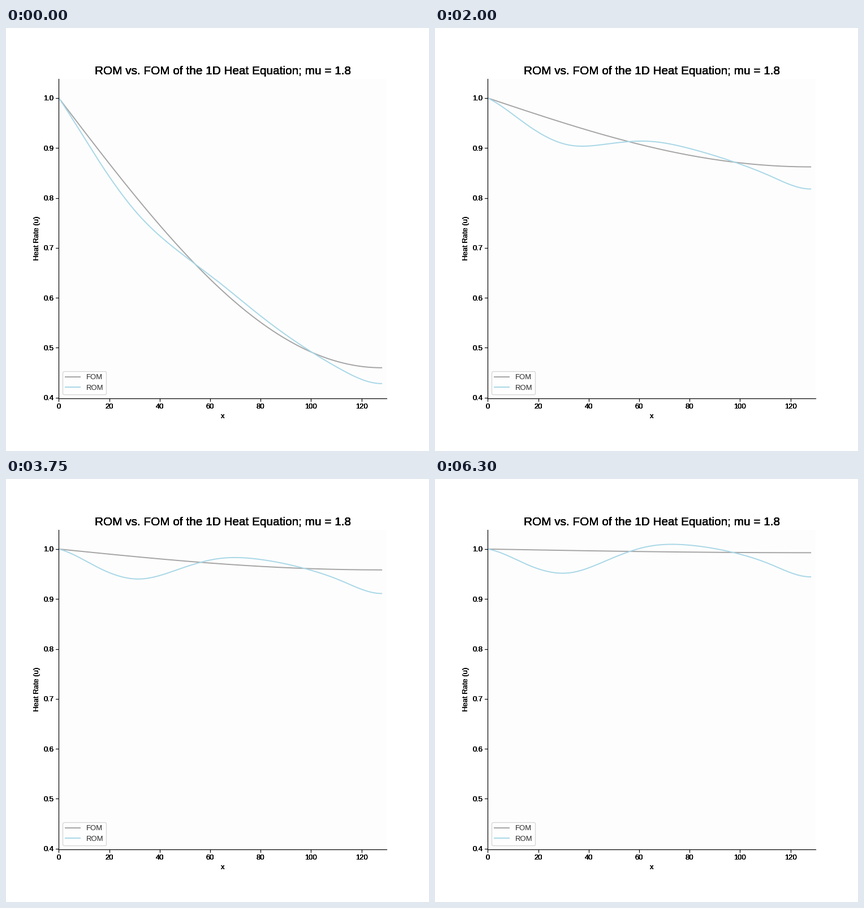
A matplotlib script that plays this animation: 748x748 px, repeating every 6350 ms.

```python
import matplotlib.pyplot as plt
import numpy as np
from matplotlib.animation import FuncAnimation

plt.rcParams.update({
    "font.family": "Liberation Sans",
    "axes.spines.top": False,
    "axes.spines.right": False,
})

FRAMES, STEP = 127, 50
LENGTH = 128
AMP, RATE = 0.540, 6.83e-4      # first heat mode and its decay per ms
RECT = (0.1249, 0.1248, 0.775, 0.755)

x = np.linspace(0, LENGTH, 257)
mode = np.sin(np.pi * x / (2 * LENGTH))


def spline(y, start_slope, end_slope=0):
    """Clamped cubic spline through evenly spaced heights."""
    y = np.array(y)
    n = len(y)
    h = LENGTH / (n - 1)
    system = 4 * np.eye(n) + np.eye(n, k=1) + np.eye(n, k=-1)
    system[0], system[-1] = np.eye(n)[0], np.eye(n)[-1]
    slopes = np.linalg.solve(
        system, [start_slope * h, *3 * (y[2:] - y[:-2]), end_slope * h])
    k = np.minimum(x // h, n - 2).astype(int)
    s = x / h - k
    ease = s * s * (3 - 2 * s)
    bend = s * (1 - s) * ((1 - s) * slopes[k] - s * slopes[k + 1])
    return y[k] + (y[k + 1] - y[k]) * ease + bend


# Gap between the two models, in thousandths: first moment and steady state
gap_start = spline([0, 21.5, 29.3, 8.9, -11, -12.8, -4.2, 14, 31.7], 0.8) / 1000
gap_end = spline([0, 30.6, 45.2, 17, -10.8, -13.9, -1.4, 23.3, 48.6], 0.8) / 1000


def full_model(decay):
    return 1 - AMP * decay * mode


def reduced_model(decay):
    return full_model(decay) - gap_end - decay * (gap_start - gap_end)


def add_axes(zorder, face="none"):
    ax = fig.add_axes(RECT, zorder=zorder, facecolor=face)
    ax.set(xlim=(0, 130), ylim=(0.399, 1.0385),
           xticks=range(0, 121, 20), yticks=np.arange(4, 11) / 10)
    ax.set_xlabel("x")
    ax.set_ylabel("Heat Rate (u)")
    ax.set_title("ROM vs. FOM of the 1D Heat Equation; mu = 1.8", fontsize=16)
    return ax


fig = plt.figure(figsize=(8, 8), dpi=93.5, facecolor="white")

# Stacked axes give the heavy, hard-edged lettering
add_axes(0, "#fdfdfd")
for layer in range(1, 4):
    add_axes(layer)
ax = add_axes(4)

fom, = ax.plot(x, full_model(1), color="#a4a4a4", lw=1.5, label="FOM")
rom, = ax.plot(x, reduced_model(1), color="#a8d7e7", lw=1.5, label="ROM")
ax.legend(loc="lower left", labelcolor="0.15")


def update(i):
    decay = np.exp(-RATE * STEP * i)
    fom.set_ydata(full_model(decay))
    rom.set_ydata(reduced_model(decay))
    return fom, rom


anim = FuncAnimation(fig, update, frames=FRAMES, interval=STEP,
                     repeat=True, repeat_delay=0)
plt.show()
```
